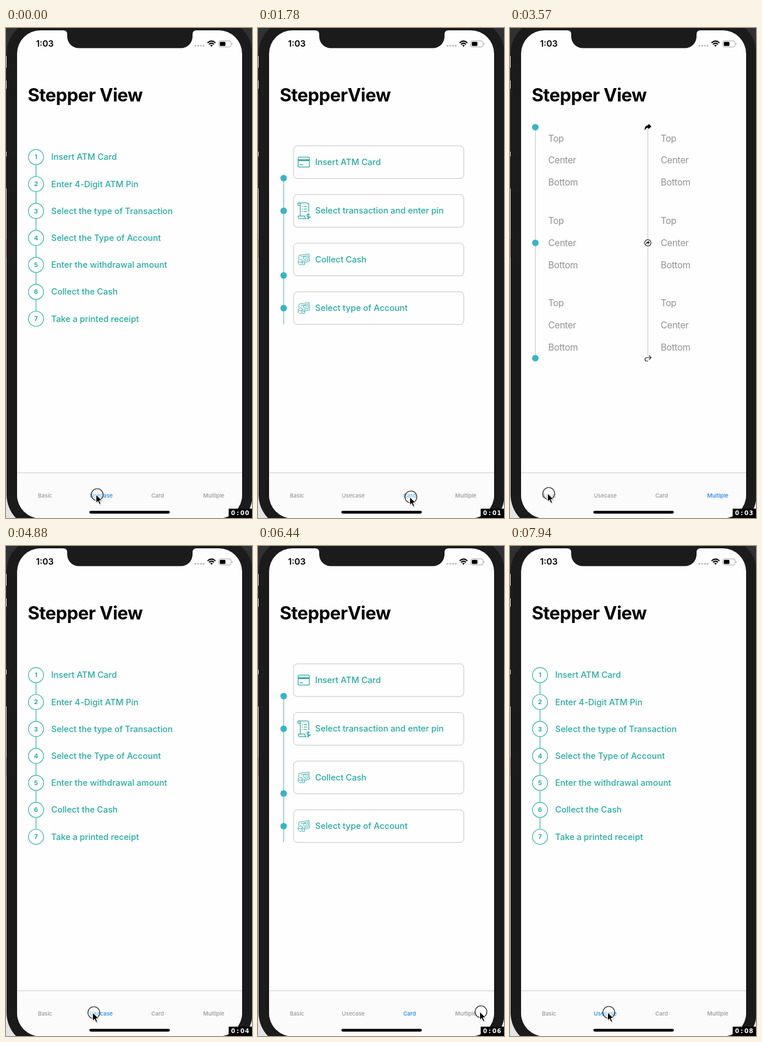
These frames come from a looping animation (422 px wide and 840 px high, 8000 ms). An HTML page:

```html
<!DOCTYPE html>
<html lang="en">
<head>
<meta charset="utf-8">
<title>Stepper View</title>
<style>
html, body { margin: 0; width: 100%; height: 100%; overflow: hidden; background: #1b1b1b; }
svg { display: block; width: 422px; height: 840px; font-family: Inter, "Liberation Sans", sans-serif; font-optical-sizing: none; }
.title { font-size: 31px; font-weight: 700; letter-spacing: -.5px; }
.step { font-size: 14.6px; font-weight: 500; letter-spacing: -.03px; fill: #27aaa6; }
.num { font-size: 10.5px; font-weight: 700; text-anchor: middle; fill: #27aaa6; }
.item { font-size: 15.6px; letter-spacing: -.3px; fill: #929294; }
.tab { font-size: 9.5px; font-weight: 500; text-anchor: middle; fill: #98989a; }
.tab.on { fill: #1687fb; }
.clock { font: 700 10.2px "DejaVu Sans", sans-serif; text-anchor: middle; fill: #fff; }
.teal { fill: none; stroke: #2cb3ad; stroke-width: 1.2; }
.icon { fill: none; stroke: #2caaa8; stroke-width: 1.3; stroke-linejoin: round; }
</style>
</head>
<body>
<svg viewBox="0 0 422 840">
  <defs>
    <path id="turn" d="M1 -6 L6 -1.2 L1 3.6 V1 C-2 1 -4 2.3 -5.3 5.6 C-6 1 -4 -3.2 1 -3.5Z"/>
  </defs>
  <rect width="422" height="840" fill="#e4e4e6"/>
  <rect width="422" height="275" fill="#303133"/>
  <path d="M0 48h1v20h-1zM0 90h1v14h-1zM0 212h1v8h-1z" fill="#eee"/>
  <rect y="362" width="1" height="32" fill="#e0575c" opacity=".4"/>
  <rect x="1" y="-14" width="422" height="872" rx="58" fill="#1b1b1b"/>
  <rect x="19" y="4" width="386" height="836.5" rx="40" fill="#fefefe"/>
  <path d="M98 3V4Q105 4 105 11V14.5A20 20 0 0 0 125 34.5H300A20 20 0 0 0 320 14.5V11Q320 4 327 4V3Z" fill="#1b1b1b"/>

  <text x="51.5" y="32.3" font-size="14.9" font-weight="600">1:03</text>
  <g fill="#c3c3c5">
    <circle cx="325" cy="30.5" r="1.7"/><circle cx="329.7" cy="30.5" r="1.7"/>
    <circle cx="334.4" cy="30.5" r="1.7"/><circle cx="339.1" cy="30.5" r="1.7"/>
  </g>
  <g fill="none" stroke="#000" stroke-width="2">
    <path d="M345.8 25.4Q352.5 19.4 359.2 25.4M348.2 28.1Q352.5 24.2 356.8 28.1"/>
    <path d="M350.2 29.8Q352.5 28 354.8 29.8L352.5 32.2Z" fill="#000" stroke="none"/>
  </g>
  <rect x="365" y="22" width="21" height="10.5" rx="3" fill="none" stroke="#a4a4a6"/>
  <rect x="366.8" y="23.8" width="9.6" height="7" rx="1.5"/>
  <path d="M387.5 25.4Q390.2 27.2 387.5 29.2Z" fill="#a4a4a6"/>

  <text id="title" class="title" x="37.2" y="125.6"></text>
  <g id="pages"></g>

  <path d="M19 762.5H405V800.5A40 40 0 0 1 365 840.5H59A40 40 0 0 1 19 800.5Z" fill="#fbfbfb"/>
  <path d="M19 762.5H405" stroke="#cbcbcd"/>
  <g id="tabs"></g>
  <rect x="143" y="827.8" width="138" height="4.6" rx="2.3"/>
  <rect x="382" y="824" width="40" height="16"/>
  <text id="clock" class="clock" x="389.5 397.5 405.5 413.5" y="835"></text>

  <g id="cursor">
    <circle r="10.2" fill="#fff" fill-opacity=".35" stroke="#111" stroke-width="1.1"/>
    <g transform="translate(-2 0)">
      <path d="M1 2V16L4.3 13L6.5 18.5L9.3 17.3L7.1 12H12Z" fill="#000" opacity=".14"/>
      <path d="M0 0V14L3.3 11L5.5 16.5L8.1 15.4L5.8 10H10.2Z" stroke="#fff" stroke-width="1"/>
    </g>
  </g>
</svg>
<script>
const $ = id => document.getElementById(id);
const LOOP = 8000;
const BLUE = '#36b4c8';
const range = n => [...Array(n).keys()];
const text = (cls, x, y, s) => `<text class="${cls}" x="${x}" y="${y}">${s}</text>`;
const dot = (x, y) => `<circle cx="${x}" cy="${y}" r="5.6" fill="${BLUE}"/>`;
const rail = (x, y1, y2, color) => `<path d="M${x} ${y1}V${y2}" stroke="${color}" stroke-width="1"/>`;

function column(x) {
  const rows = range(9).map(i => {
    const y = 194.6 + Math.floor(i / 3) * 141.4 + i % 3 * 37.8;
    return text('item', x, y, ['Top', 'Center', 'Bottom'][i % 3]);
  });
  return rail(x - 22, 170, 566, '#c6c6c8') + rows.join('');
}

const dotColumn = column(65.5) + [170, 368.3, 566].map(y => dot(43.5, y)).join('');

const iconColumn = column(258.5) + `
  <use href="#turn" x="236.5" y="170"/>
  <circle cx="236.5" cy="368.3" r="5.4" fill="#fefefe" stroke="#111" stroke-width="1.1"/>
  <use href="#turn" transform="translate(236.5 368.3) scale(.55)"/>
  <rect x="231" y="561" width="11.5" height="11" fill="#fefefe"/>
  <path d="M238.5 561.5L242 565L238.5 568.5M242 565H234.5Q231.6 565 231.6 568T234.5 571H237"
    fill="none" stroke="#222" stroke-width="1.2"/>`;

const atmSteps = ['Insert ATM Card', 'Enter 4-Digit ATM Pin', 'Select the type of Transaction',
  'Select the Type of Account', 'Enter the withdrawal amount', 'Collect the Cash', 'Take a printed receipt'];

const usecase = atmSteps.map((s, i) => {
  const y = 221.3 + i * 46.2;
  const link = i < 6 ? `<path class="teal" d="M51.5 ${y + 13}v20.2"/>` : '';
  return `<circle class="teal" cx="51.5" cy="${y}" r="13"/>` + link +
    text('num', 51.5, y + 3.9, i + 1) + text('step', 77.5, y + 5.1, s);
}).join('');

const cardIcon = `<rect x="-9.6" y="-8.6" width="19.2" height="17" rx="2"/>
  <path d="M-9.6 -3.4H9.6" stroke-width="3"/><path d="M-7 4.5h6"/>`;
const receiptIcon = `<path d="M-6 9V-10Q-6 -13.5 -9 -13.5Q-11 -13 -10 -9.5H-6M-9 -13.5H6Q8.5 -13 8.5 -10V2
  M-6 9H-9.5Q-10 13.5 -6 13.5H4Q1.5 13 2 9H-6M-3 -7h1.5M-3 -3h1.5M-3 1h1.5M0 -7h5.5M0 -3h5.5M0 1h5.5
  M10 6.5Q5.5 4.5 5.5 7.5T10 10.5T5.5 13M7.8 4v11"/>`;
const cashIcon = `<g stroke-width=".9"><path d="M-8 -7L9 -9.5L10 3L-2 6M-8 -7L-9 0M-5 -4.5L7 -6.5L7.5 1L1 2.5"/>
  <circle cx="2" cy="-2.5" r="2.6"/><path d="M-9.5 2Q-6 -2 -3 0V8Q-6 11 -9.5 7ZM-3 3Q1 2 1.5 5V9H-3M-9.5 4.5H-3"/></g>`;

const cards = [['Insert ATM Card', cardIcon], ['Select transaction and enter pin', receiptIcon],
  ['Collect Cash', cashIcon], ['Select type of Account', cashIcon]];

const card = rail(44, 257, 508, '#4aa9b4') + [257.3, 313.4, 424.2, 480.3].map(y => dot(44, y)).join('') +
  cards.map(([s, icon], i) => {
    const y = 230 + i * 83.4;
    return `<rect x="61" y="${y - 28}" width="292" height="56" rx="6.5" fill="none" stroke="#c3c3c5"/>
      <g class="icon" transform="translate(78.5 ${y})">${icon}</g>` + text('step', 98, y + 4.9, s);
  }).join('');

$('pages').innerHTML = [dotColumn, usecase, card, dotColumn + iconColumn].map(p => `<g>${p}</g>`).join('');
$('tabs').innerHTML = ['Basic', 'Usecase', 'Card', 'Multiple']
  .map((s, i) => text('tab', 67 + i * 96.5, 804.6, s)).join('');

const pages = [...$('pages').children], tabs = [...$('tabs').children];

// [time, page]
const switches = [[0, 1], [1040, 2], [2440, 3], [3930, 0], [4880, 1], [5780, 2], [6710, 3], [7670, 1]];
// times at which the clock advances
const ticks = [980, 1990, 3040, 3990, 5000, 5960, 6980, 7940];
// [start, end, x, y, bend]: glide to x, y, bending the path vertically
const start = [156.5, 800];
const moves = [
  [150, 620, 252.5, 804.5, 0], [1690, 2180, 360.5, 803.5, -3], [3010, 3570, 66.5, 798, -35],
  [4200, 4680, 150.7, 800, -4], [5140, 5480, 284, 808, -11], [6110, 6440, 382.5, 798.5, 0],
  [6950, 7460, 169.5, 799.5, 0]];

function cursorAt(t) {
  let [x, y] = start;
  for (const [a, b, tx, ty, bend] of moves) {
    if (t < a) break;
    const k = Math.min(1, (t - a) / (b - a));
    const e = k * k * (3 - 2 * k);
    x += (tx - x) * e;
    y += (ty - y) * e + 2 * bend * e * (1 - e);
  }
  return [x, y];
}

function draw(t) {
  const [since, page] = switches.filter(s => s[0] <= t).pop();
  const reload = (since === 3930 || since === 7670) && t < since + 60;
  pages.forEach((p, i) => p.style.display = i === page ? '' : 'none');
  tabs.forEach((p, i) => p.classList.toggle('on', i === page));
  $('title').textContent = reload ? '' : page === 2 ? 'StepperView' : 'Stepper View';
  $('clock').textContent = '0:0' + ticks.filter(s => s <= t).length;
  $('cursor').setAttribute('transform', `translate(${cursorAt(t).map(v => v.toFixed(2)).join(' ')})`);
}

const t0 = performance.now();
function frame() {
  draw((performance.now() - t0) % LOOP);
  requestAnimationFrame(frame);
}
draw(0);
requestAnimationFrame(frame);
</script>
</body>
</html>
```
